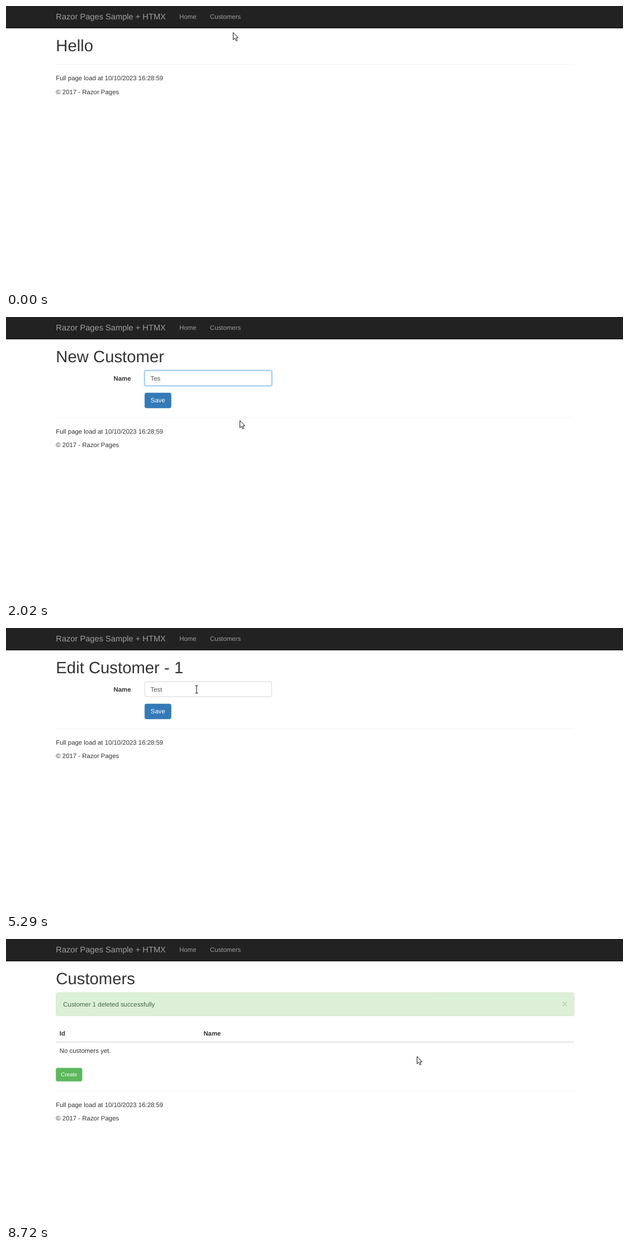
An HTML page for the animation above (8.78 s loop, 1104 by 507 pixels).

```html
<!DOCTYPE html>
<html lang="en">
<head>
<meta charset="utf-8">
<title>Customers</title>
<style>
  html, body { margin: 0; width: 100%; height: 100%; overflow: hidden; background: #fff; }
  svg { display: block; width: 1104px; height: 507px; }
  text { font-family: "Liberation Sans", Arial, sans-serif; text-rendering: geometricPrecision; white-space: pre; }
</style>
</head>
<body>
<svg viewBox="0 0 1104 507">
  <g id="page"></g>
  <g id="pointer">
    <circle id="ripple" r="10" fill="#ffe100" opacity=".72"/>
    <g stroke="#111" fill="#fff" stroke-linejoin="round">
      <path id="arrow" d="M.5 .5V13.6L3.5 10.8 5.6 15.5 7.7 14.6 5.7 10H9.6Z"/>
      <path id="hand" d="M-1.5 10V1.5Q-1.5 0 0 0T1.5 1.5V6.5L6.5 7.6Q8.5 8.2 8.4 10.2L7.4 14.5V17.5H-.6V15.6L-4 11Q-4.8 9 -3 8.8L-1.5 10Z"/>
      <path id="beam" fill="none" d="M-2.5 -6.5H2.5M0 -6V6M-2.5 6.5H2.5"/>
    </g>
  </g>
</svg>
<script>
const LOOP = 8780;

// The page is laid out in its own pixels: x = 0 is the left edge of the content.
const SCALE = .8136, DX = 89.3, DY = -1.5, WIDTH = 1140;
const LINE = 20, BASE = 15, GAP = 20;
const TOP = 119.6;

const BLUE = { rest: '#337ab7', hover: '#286090', down: '#204d74' };
const GREEN = { rest: '#5cb85c', hover: '#449d44', down: '#398439' };
const RED = { rest: '#d9534f', hover: '#c9302c', down: '#8b211e' };

const views = [
  { at: 0, draw: () => heading('Hello') + footer(TOP + 10) },
  { at: 320, draw: () => list() },
  { at: 980, draw: () => form('New Customer', '', { click: 1590, typed: 'Test', type: 1800, tab: 2130 }) },
  { at: 2510, caretUntil: 4040, draw: () => list('New customer created successfully!', 'Test') },
  { at: 4390, caretUntil: 5490, draw: () => form('Edit Customer - 1', 'Test', { click: 5490, typed: '2', type: 5960, tab: 6070 }) },
  { at: 6420, draw: () => list('Customer updated successfully!', 'Test2', 7090) },
  { at: 7540, draw: () => list('Customer 1 deleted successfully', '', 7540) },
];

// Each move: start, end, then the stage point reached.
const moves = [
  [0, 0, 406, 47], [30, 240, 414, 20], [620, 850, 115, 186], [980, 1220, 418, 168],
  [1480, 1570, 400, 112], [1700, 1860, 418, 185], [3170, 3470, 520, 197], [3640, 3700, 534, 199],
  [4620, 4920, 341, 110], [6210, 6360, 521, 114], [6390, 6720, 586, 198], [7060, 7340, 735, 210],
];
const clicks = [260, 880, 1590, 4010, 5490, 7025];
const CLICK_TIME = 80, BLINK = 465, KEY_TIME = 80;

let now, view, mouse, shape, pressed;

const blink = since => now >= since && (now - since) % BLINK < BLINK / 2;
const viewAt = t => views.findLast(v => t >= v.at);
const smooth = u => u * u * (3 - 2 * u);

function pointerAt(t) {
  let x, y;
  for (const [start, end, toX, toY] of moves) {
    if (t < start) break;
    const k = t < end ? smooth((t - start) / (end - start)) : 1;
    x = k === 1 ? toX : x + (toX - x) * k;
    y = k === 1 ? toY : y + (toY - y) * k;
  }
  return [x, y];
}

function hovers(x, y, w, h, kind) {
  const inside = mouse[0] >= x && mouse[0] < x + w && mouse[1] >= y && mouse[1] < y + h;
  if (inside) shape = kind;
  return inside;
}

const text = (x, y, s, { size = 14, fill = '#333', weight = 'normal', anchor = 'start' } = {}) =>
  `<text x="${x}" y="${y}" font-size="${size}" fill="${fill}" font-weight="${weight}" text-anchor="${anchor}">${s}</text>`;
const rect = (x, y, w, h, fill) => `<rect x="${x}" y="${y}" width="${w}" height="${h}" fill="${fill}"/>`;
const box = (x, y, w, h, fill, stroke, r = 4, line = 1) =>
  `<rect x="${x + line / 2}" y="${y + line / 2}" width="${w - line}" height="${h - line}" rx="${r - line / 2}"
    fill="${fill}" stroke="${stroke}" stroke-width="${line}"/>`;
const caret = (x, y, h) => rect(x, y, 1.2, h, '#111');
const heading = s => text(0, 102, s, { size: 36 });

function button(x, y, w, h, label, colors, { size = 12, focused = false } = {}) {
  const hot = hovers(x, y, w, h, 'hand');
  const fill = hot && pressed ? colors.down : hot || focused ? colors.hover : colors.rest;
  const ring = focused
    ? box(x, y, w, h, 'none', '#222') + box(x + 1, y + 1, w - 2, h - 2, 'none', '#fff', 3) +
      box(x + 2, y + 2, w - 4, h - 4, 'none', '#0b0b0d', 3, 2)
    : '';
  return box(x, y, w, h, fill, focused ? '#222' : hot ? colors.down : colors.rest) + ring +
    text(x + w / 2, y + h / 2 + size / 3, label, { size, fill: '#fff', anchor: 'middle' });
}

function navbar() {
  const grey = '#9d9d9d', y = 30;
  const hot = hovers(324, 0, 98, 50, 'hand');
  return rect(-DX / SCALE, 0, 1104 / SCALE, 51, '#222') + rect(-DX / SCALE, 50, 1104 / SCALE, 1, '#080808') +
    text(0, y + 1, 'Razor Pages Sample + HTMX', { size: 18, fill: grey }) +
    text(271.6, y, 'Home', { fill: grey }) +
    text(339, y, 'Customers', { fill: hot ? '#fff' : grey });
}

function footer(y) {
  const first = y + 1 + GAP, second = first + LINE + 10;
  const showCaret = now < view.caretUntil && blink(view.at);
  return rect(0, y, WIDTH, 1, '#eee') +
    text(0, first + BASE, 'Full page load at 10/10/2023 16:28:59') +
    text(0, second + BASE, '© 2017 - Razor Pages') +
    (showCaret ? caret(138.5, second + 2, 16) : '');
}

function form(title, initial, { click, typed, type, tab }) {
  const x = 195, h = 34, saveY = TOP + h + 15, base = TOP + 7 + BASE;
  const onName = now >= click && now < tab, onSave = now >= tab;
  const keys = Math.max(0, Math.floor((now - type) / KEY_TIME) + 1);
  const value = initial + typed.slice(0, keys);
  hovers(x, TOP, 280, h, 'beam');
  return heading(title) +
    text(165, base, 'Name', { weight: 'bold', anchor: 'end' }) +
    (onName ? box(x - 2, TOP - 2, 284, h + 4, 'none', '#c8e0f6', 5, 3) : '') +
    box(x, TOP, 280, h, '#fff', onName ? '#66afe9' : '#ccc') +
    text(x + 13, base, value, { fill: '#555' }) +
    (onName && blink(click) ? caret(x + 13 + value.length * 6.9, base - 13, 16) : '') +
    button(x, saveY, 58.7, h, 'Save', BLUE, { size: 14, focused: onSave }) +
    footer(saveY + h + GAP);
}

function alertBox(message) {
  return box(0, TOP, WIDTH, 52, '#dcefd7', '#d0e6c4') +
    text(16, TOP + 16 + BASE, message, { fill: '#48694a' }) +
    text(1119, TOP + 32, '×', { size: 21, weight: 'bold', fill: '#bbd2b6', anchor: 'middle' });
}

function list(message, name, caretFrom) {
  const top = message ? TOP + 52 + GAP : TOP;
  const row = top + 38, rowHeight = name ? 38 : 36, bottom = row + rowHeight;
  const cells = name
    ? text(8, row + 8 + BASE, '1') + text(190, row + 8 + BASE, name) +
      button(535.5, row + 8, 31.3, 22, 'edit', BLUE) +
      button(571, row + 8, 44.7, 22, 'delete', RED, { focused: now >= caretFrom - 70 })
    : text(8, row + 8 + BASE, 'No customers yet.');
  return heading('Customers') + (message ? alertBox(message) : '') +
    text(8, top + 8 + BASE, 'Id', { weight: 'bold' }) +
    text(name ? 190 : 324.6, top + 8 + BASE, 'Name', { weight: 'bold' }) +
    rect(0, top + 36, WIDTH, 2, '#ddd') + cells +
    button(0, bottom + GAP, 58, 30, 'Create', GREEN) +
    (blink(caretFrom) ? caret(WIDTH - 1, top, bottom - top) : '') +
    footer(bottom + GAP + 30 + GAP);
}

const $ = id => document.getElementById(id);
$('page').setAttribute('transform', `translate(${DX} ${DY}) scale(${SCALE})`);
let shown = '';

function draw(t) {
  const [x, y] = pointerAt(t);
  now = t;
  view = viewAt(t);
  mouse = [(x - DX) / SCALE, (y - DY) / SCALE];
  shape = 'arrow';
  pressed = clicks.some(c => t >= c && t < c + CLICK_TIME);

  const html = view.draw() + navbar();
  if (html !== shown) $('page').innerHTML = shown = html;

  // The pointer falls back to an arrow just before the next page arrives.
  if (viewAt(t + 35) !== view) shape = 'arrow';
  for (const id of ['arrow', 'hand', 'beam']) $(id).style.display = id === shape ? '' : 'none';
  $('ripple').style.display = pressed ? '' : 'none';
  $('pointer').setAttribute('transform', `translate(${x} ${y})`);
}

const start = performance.now();
function tick() {
  draw((performance.now() - start) % LOOP);
  requestAnimationFrame(tick);
}
tick();
</script>
</body>
</html>
```
